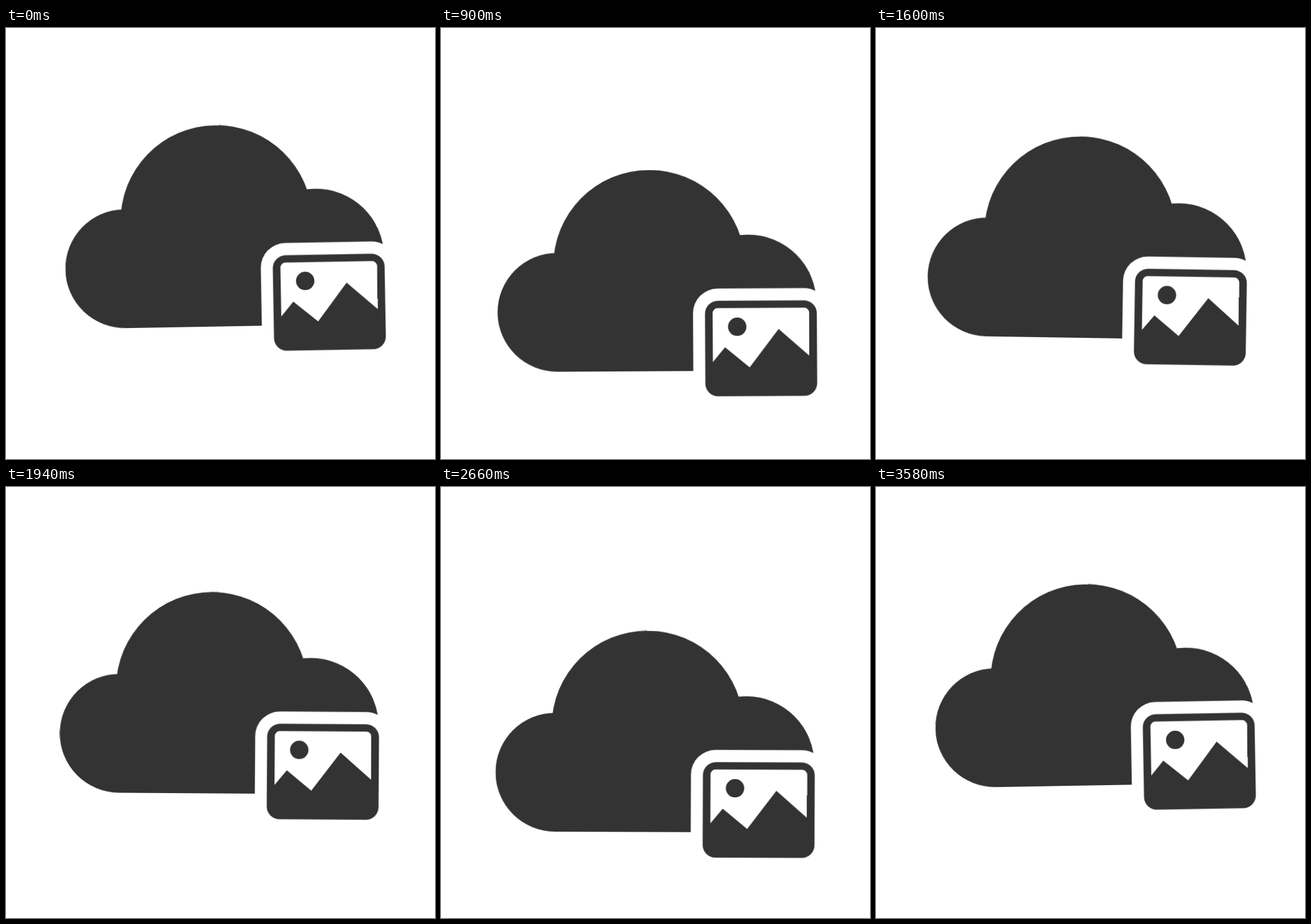
Write an HTML page that moves like this. It is 700 px wide and 704 px high and loops after 3600 ms.

```html
<!DOCTYPE html>
<html lang="en">
<head>
<meta charset="utf-8">
<title>Floating cloud</title>
<style>
  html, body { margin: 0; width: 100%; height: 100%; overflow: hidden; background: #fff; }
  svg { display: block; width: 100vw; height: 100vh; }
  g {
    transform-box: view-box;
    transform-origin: 0 50px;
    /* close to a half cosine */
    animation-timing-function: cubic-bezier(.364, 0, .636, 1);
    animation-iteration-count: infinite;
    animation-delay: -10ms;
  }
  .bob { animation-name: bob; animation-duration: 900ms; animation-direction: alternate; }
  .sway { animation-name: sway; animation-duration: 1200ms; }
  .ink { fill: #333; }
  .gap { fill: #fff; }
  @keyframes bob {
    from { transform: translateY(-34.5px); }
    to { transform: translateY(34.5px); }
  }
  @keyframes sway {
    0%, 100% { transform: rotate(-1deg); }
    40% { transform: rotate(1deg); }
  }
</style>
</head>
<body>
<svg viewBox="0 0 700 704">
  <g class="bob"><g class="sway">
    <!-- cloud -->
    <circle class="ink" cx="338.1" cy="355.7" r="156.5"/>
    <circle class="ink" cx="187.3" cy="430.9" r="97"/>
    <circle class="ink" cx="499.4" cy="416.7" r="111"/>
    <path class="ink" d="M187.3 345H499.4V527.9H187.3z"/>
    <!-- picture badge -->
    <rect class="gap" x="409.2" y="393.6" width="221.5" height="196" rx="40"/>
    <rect class="ink" x="428.7" y="413.6" width="182.5" height="156" rx="21"/>
    <path class="gap" d="M441.2 513.6V433.6a8 8 0 0 1 8-8H590.7a8 8 0 0 1 8 8V504.1L548.7 460.1 501.2 522.6 461.2 489.6z"/>
    <circle class="ink" cx="481.2" cy="456.1" r="15"/>
  </g></g>
</svg>
</body>
</html>
```
